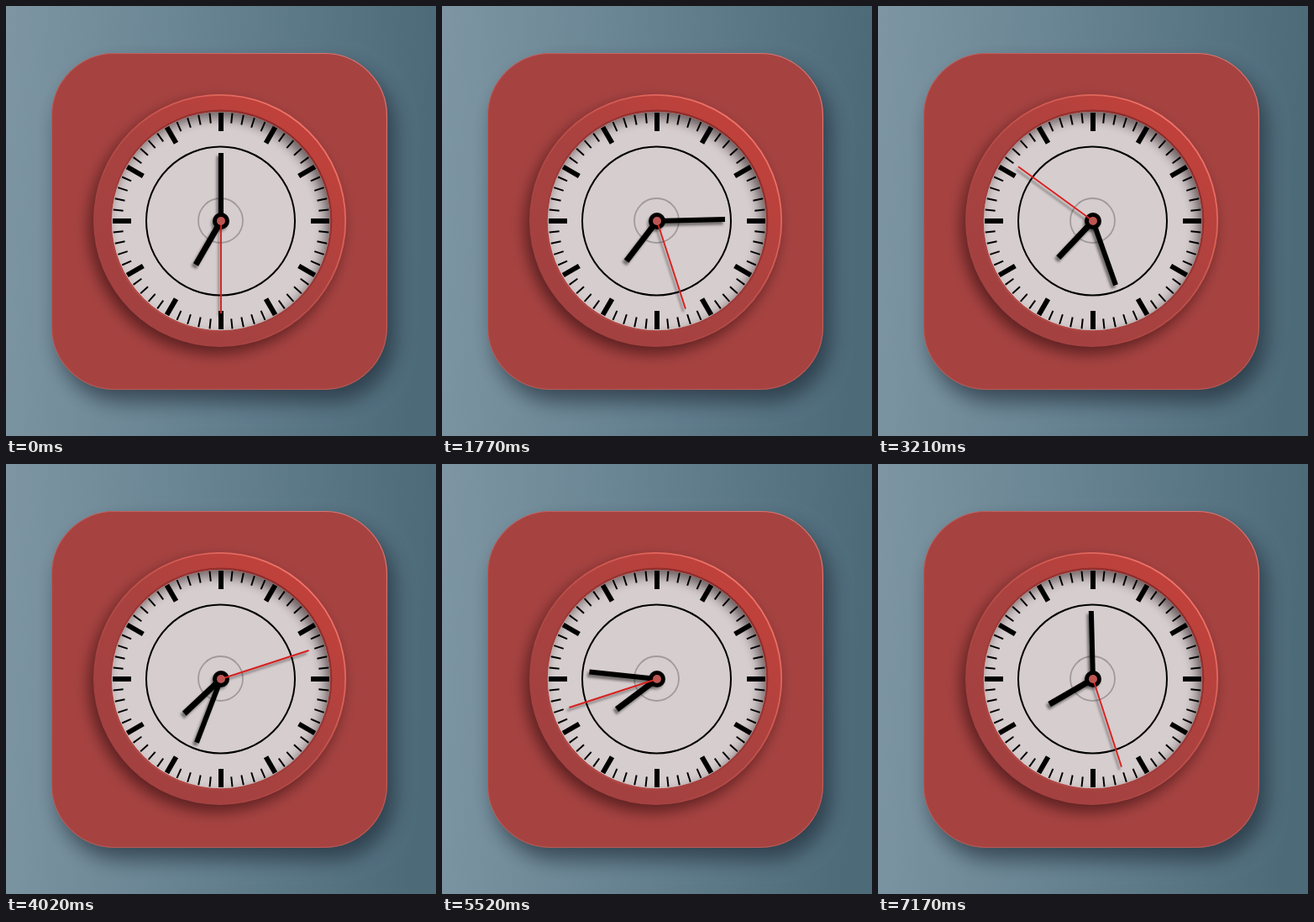
Recreate the animation shown at these times as an HTML page with a canvas. Size 512 px wide and 512 px high, loop 7200 ms.

```html
<!DOCTYPE html>
<html lang="en">
<head>
<meta charset="utf-8">
<title>Clock</title>
<style>
  html, body { margin: 0; width: 100%; height: 100%; overflow: hidden; background: #647f8e; }
  canvas { display: block; width: 512px; height: 512px; }
</style>
</head>
<body>
<canvas id="stage" width="512" height="512"></canvas>
<script>
const SIZE = 512, LOOP = 7200, STEP = 30, TAU = Math.PI * 2;
const C = 256;
const stage = document.getElementById('stage').getContext('2d');
const still = document.createElement('canvas');
still.width = still.height = SIZE;

function gradient(g, x0, y0, x1, y1, stops) {
  const fill = g.createLinearGradient(x0, y0, x1, y1);
  stops.forEach((color, i) => fill.addColorStop(i / (stops.length - 1), color));
  return fill;
}

function shadow(g, color, x, y, blur) {
  g.shadowColor = color;
  g.shadowOffsetX = x;
  g.shadowOffsetY = y;
  g.shadowBlur = blur;
}

function circle(x, y, r) {
  const path = new Path2D();
  path.arc(x, y, r, 0, TAU);
  return path;
}

function stroke(g, path, color, width) {
  g.strokeStyle = color;
  g.lineWidth = width;
  g.stroke(path);
}

// Radial line at a clockwise angle in degrees, 0 pointing up
function spoke(g, deg, from, to, width, color) {
  g.save();
  g.translate(C, C);
  g.rotate(deg * Math.PI / 180);
  g.fillStyle = color;
  g.fillRect(-width / 2, -to, width, to - from);
  g.restore();
}

function drawPanel(g) {
  g.fillStyle = gradient(g, 0, 0, SIZE, 30, ['#7e96a3', '#658190', '#4d6a79']);
  g.fillRect(0, 0, SIZE, SIZE);

  const panel = new Path2D();
  panel.roundRect(54, 56, 400, 401, 75);
  g.save();
  shadow(g, 'rgba(20,30,42,.6)', 8, 14, 24);
  g.fillStyle = '#a64341';
  g.fill(panel);
  g.restore();

  const edge = new Path2D();
  edge.roundRect(54.5, 56.5, 399, 400, 74.5);
  stroke(g, edge, gradient(g, 120, 400, 400, 90,
    ['rgba(205,125,120,.4)', 'rgba(205,115,110,.5)', 'rgba(225,125,118,.85)']), 1.2);
}

function drawRing(g) {
  const ring = circle(254.5, 255.5, 150.5);
  g.save();
  shadow(g, 'rgba(50,12,14,.65)', -5, 8, 18);
  g.fillStyle = gradient(g, 160, 370, 350, 150, ['#a34140', '#a84240', '#c0413b']);
  g.fill(ring);
  g.restore();
  stroke(g, circle(254.5, 255.5, 149.7), gradient(g, 180, 330, 360, 150,
    ['rgba(235,110,100,0)', 'rgba(235,110,100,.35)', 'rgba(240,118,108,.95)']), 1.8);
  stroke(g, circle(C, C, 131.2), gradient(g, 170, 360, 340, 150,
    ['rgba(185,80,76,.7)', 'rgba(140,45,43,.5)', 'rgba(125,35,34,.75)']), 2.4);
}

function drawFace(g) {
  const face = circle(C, C, 130);
  g.fillStyle = '#d6cdce';
  g.fill(face);

  // Soft shade cast inwards by the rim
  g.save();
  g.clip(face);
  const rim = circle(C, C, 180);
  rim.addPath(circle(C, C, 130.5));
  shadow(g, 'rgba(45,30,32,.65)', -5, 7, 14);
  g.fillStyle = '#a84240';
  g.fill(rim, 'evenodd');
  g.restore();
  stroke(g, circle(C, C, 129.7), gradient(g, 170, 350, 340, 160,
    ['rgba(235,225,225,.5)', 'rgba(190,150,150,.4)', 'rgba(150,100,100,.3)']), 1);

  for (let i = 0; i < 60; i++) {
    const major = i % 5 === 0;
    spoke(g, i * 6, major ? 107 : 117, 129, major ? 6 : 2, '#000');
  }
  stroke(g, circle(255.5, 256, 88.5), '#000', 2);
  stroke(g, circle(255.5, 255.5, 26.5), '#a19a9b', 1.8);
}

function hand(deg, length, width, color) {
  stage.save();
  shadow(stage, 'rgba(0,0,0,.45)', -2.5, 3.5, 3);
  spoke(stage, deg, 0, length, width, color);
  stage.restore();
}

function drawHands(turn) {
  hand(210 + 30 * turn, 60, 7, '#000');
  hand(360 * turn, 81, 6, '#000');
  stage.save();
  shadow(stage, 'rgba(0,0,0,.35)', -2, 3, 3);
  stage.fillStyle = '#000';
  stage.fill(circle(C, C, 10));
  stage.restore();
  hand(180 + 360 * 12 * turn, 110, 1.9, '#d8211f');
  stage.fillStyle = '#bd5652';
  stage.fill(circle(C, C, 5));
}

const base = still.getContext('2d');
drawPanel(base);
drawRing(base);
drawFace(base);

const start = performance.now();
function frame(now) {
  const time = Math.max(0, now - start) % LOOP;
  const tick = Math.floor((time + 0.01) / STEP);
  stage.drawImage(still, 0, 0);
  drawHands(tick * STEP / LOOP);
  requestAnimationFrame(frame);
}
frame(start);
</script>
</body>
</html>
```
